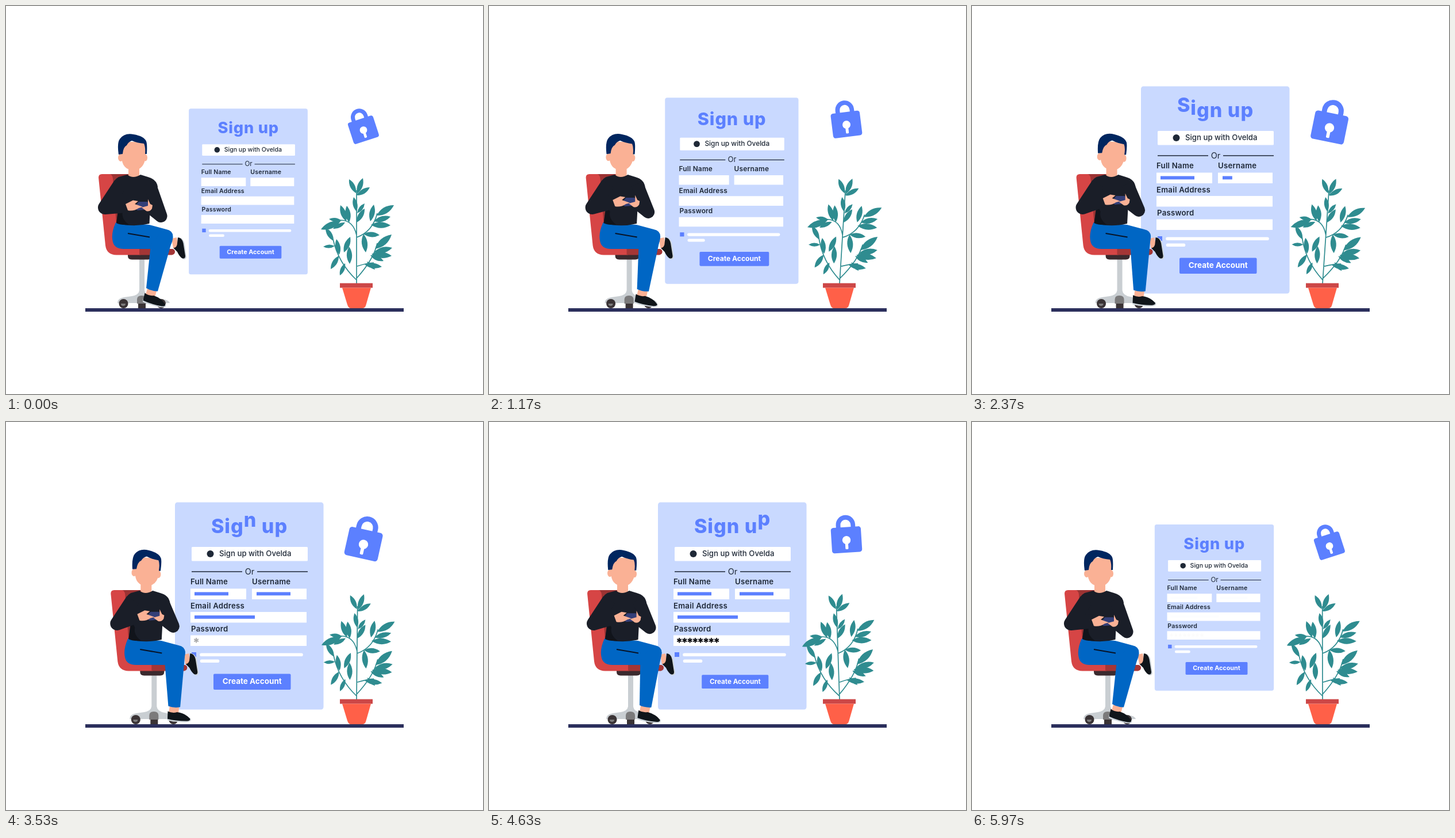
An HTML page for the animation above (6010 ms loop, 830 by 674 pixels).

```html
<!DOCTYPE html>
<html lang="en">
<head>
<meta charset="utf-8">
<title>Sign up</title>
<style>
  html, body { margin: 0; width: 100%; height: 100%; overflow: hidden; background: #fff; }
  svg { display: block; width: 830px; height: 674px; }
  text { font-family: Inter, "Open Sans", sans-serif; fill: #1f2937; }
  .label { font-size: 13.2px; font-weight: 600; letter-spacing: .25px; }
  .title { font-size: 34px; font-weight: 800; letter-spacing: 1px; text-anchor: middle; }
  .star { font-size: 21px; font-weight: 800; text-anchor: middle; fill: #0b0b10; }
  .blue, .title { fill: #5c80ff; }
  .white { fill: #fff; }
  .skin { fill: #fab195; }
  .pants { fill: #0066c4; }
  .sweater { fill: #1a1e28; }
  .sleeve { fill: none; stroke: #1a1e28; stroke-linejoin: round; }
  .shoe { fill: #10151a; }
  .sole { fill: #cfd6dc; }
</style>
</head>
<body>
<svg viewBox="0 0 830 674">
  <g id="panel">
    <rect x="294" y="139.5" width="258.5" height="360" rx="4.5" fill="#c9d9ff"/>
    <text id="title" class="title" x="423.5" y="193">Sign up</text>
    <rect class="white" x="323" y="217" width="202" height="24.5" rx="1.5"/>
    <circle cx="355.5" cy="229" r="6" fill="#1f2937"/>
    <text x="371" y="233" font-size="13.2" font-weight="500">Sign up with Ovelda</text>
    <path d="M323 260H411M437 260H525" stroke="#1f2937" stroke-width="1.4"/>
    <text x="424" y="264.5" font-size="14.5" text-anchor="middle">Or</text>
    <text class="label" x="321" y="282">Full Name</text>
    <text class="label" x="428" y="282">Username</text>
    <text class="label" x="321" y="323.5">Email Address</text>
    <text class="label" x="322" y="363.5">Password</text>
    <path class="white" d="M321 289.5h97v18.5h-97zM428 289.5h95v18.5h-95zM321 330h202v18.5h-202zM321 370.5h202v18.5h-202z"/>
    <g id="entries"></g>
    <rect class="blue" x="323" y="400" width="8" height="8"/>
    <path d="M340 404.3H514M340.5 415.2H368.5" stroke="#fff" stroke-width="5.6" stroke-linecap="round"/>
    <g id="button">
      <rect class="blue" x="361" y="437.5" width="134.5" height="27.5" rx="2"/>
      <text class="white" x="428.3" y="455.3" font-size="13.5" font-weight="700" text-anchor="middle">Create Account</text>
    </g>
  </g>

  <g id="lock">
    <path d="M-13-21V-27a13 13 0 0 1 26 0V-21" fill="none" stroke="#5c80ff" stroke-width="8"/>
    <rect class="blue" x="-26.5" y="-23" width="53" height="45" rx="4.5"/>
    <circle class="white" r="7.3"/>
    <rect class="white" x="-2.6" y="2" width="5.2" height="14" rx="1.5"/>
  </g>

  <rect x="138" y="525" width="554" height="6" fill="#2b2f5c"/>

  <g id="plant" fill="#2f8c90">
    <path fill="none" stroke="#2f8c90" stroke-width="1.7"
      d="M610 483V320M610 402Q638 392 646 360M610 398Q604 372 582 372M610 473Q640 440 646 412M610 476Q578 446 569 405M611 452Q630 446 640 446M610 328L618 322"/>
    <path id="leaves"/>
  </g>
  <rect x="581" y="481.5" width="57" height="8" fill="#cc4747"/>
  <path fill="#ff6048" d="M585 489.500H635L626.500 519Q625 525 620 525H600Q596 525 594 519Z"/>

  <g id="sitter">
    <g fill="#c9ced2">
      <path d="M232 438h9v56Q242 503 255 505L272 509Q284 511 285 516H194Q194 508 205 506L219 504Q231 502 232 494Z"/>
    </g>
    <g fill="#3a3335">
      <circle cx="204.500" cy="517" r="8"/><circle cx="270" cy="517" r="8"/>
      <rect x="230" y="511" width="13" height="14"/>
    </g>
    <path d="M228 517v-7q0-7 8-7t8 7v7z" fill="#7b7a7b"/>
    <path d="M200 517a4 4 0 0 0 8 0zM266 517a4 4 0 0 0 8 0z" fill="#7b7a7b"/>
    <path d="M212 431h42v3q0 6.500-7 6.500h-28q-7 0-7-6.500z" fill="#3a2a2e"/>
    <path d="M180 292H213Q219 292 220 299L227 432H190Z" fill="#9c3333"/>
    <path d="M161 298Q161 292 167 292H180Q185 292 186 300L194 405Q196 418 210 420L234 422V432.500H192Q175 432 173 416Z" fill="#d64545"/>
    <path d="M232 422H290Q294 423 294 427T289 432.500H232Z" fill="#a43636"/>

    <path class="skin" d="M288 404L297 402 300 419 291 421Z"/>
    <path class="sole" d="M302 402Q309 404 311 414L314 436Q313 441 308 440L300 420Z"/>
    <path class="shoe" d="M299 402Q306 402 308.500 412L312 434Q312 440 306 438Q301 434 298 427L291.500 420.500Q298 419 298 412Z"/>

    <path class="pants" d="M191 376Q182 396 186 410Q189 422 205 422H256L276 424Q290 418 290.500 400Q290 390 279 388L249 380Z"/>
    <g id="shin">
      <path class="skin" d="M247 488L263 492 258 509 242 504Z"/>
      <path class="sole" d="M238 509L278 518V522Q275 524 268 523Q248 519 238 514Z"/>
      <path class="shoe" d="M241.500 498.500Q249 504 257 503Q270 507 277 518Q278 522 271 521.500Q252 518 238.500 511.500Z"/>
      <path class="pants" d="M252 414L244 490Q252 495 264 495.500L290.500 402 274 388Z"/>
    </g>
    <path d="M212 395L250 401.500" stroke="#081326" stroke-width="2"/>

    <path class="skin" d="M213 275H232V293Q232 301 222 300T213 292Z"/>
    <path class="sweater" d="M211 293Q221 301 234 293L247 297Q262 301 264 314L251 350L249.500 378Q221 385 192 377L196 345L186 312Q187 302 196 297Z"/>
    <path d="M197 345L203 357Q200 370 214 380Q200 381 192 377Z" fill="#11141b"/>
    <path id="armL" class="sleeve" stroke-width="24"/>
    <path id="armR" class="sleeve" stroke-width="22"/>
    <g id="hands">
      <path d="M223 350L231 340 246 340 250 345 241 354 229 355Z" fill="#343f78"/>
      <path class="skin" d="M208 344L221 337.500 230 339 224 344 238 349 231 351Q222 357 212 355Z"/>
      <path class="skin" d="M247 335.500L251 344 255 346 254 352Q250 358 244 356L236 350 247 347Z"/>
    </g>
    <g id="head">
      <g class="skin">
        <ellipse cx="199.500" cy="263.500" rx="4.500" ry="6.500"/>
        <ellipse cx="242.500" cy="263.500" rx="3.500" ry="6"/>
        <path d="M200 236H243V262Q240 285 222 285Q202 285 201 262Z"/>
      </g>
      <path fill="#00265f" d="M196 258Q193 238 198 231Q206 220 222 223Q240 226 244 235Q246 240 245 257H242Q243 245 240 239Q228 238 219 234Q213 236 210 242Q204 245 203 257Z"/>
    </g>
  </g>
</svg>

<script>
const LOOP = 6010;
const $ = id => document.getElementById(id);
const set = (el, name, value) => el.setAttribute(name, value);
const clamp = u => Math.min(1, Math.max(0, u));
const ramp = (t, start, length) => clamp((t - start) / length);
const ease = (t, start, length) => { const u = ramp(t, start, length); return u * u * (3 - 2 * u); };
const hump = (t, peak, half) => Math.cos(Math.PI / 2 * Math.min(1, Math.abs(t - peak) / half)) ** 2;
const scaleAt = (s, x, y) => `translate(${x * (1 - s)} ${y * (1 - s)}) scale(${s})`;

// Each leaf runs from its base to its tip.
const leaf = ([x, y, u, v]) => {
  const mx = (x + u) / 2, my = (y + v) / 2, nx = (y - v) * .31, ny = (u - x) * .31;
  return `M${x} ${y}Q${mx + nx} ${my + ny} ${u} ${v}Q${mx - nx} ${my - ny} ${x} ${y}Z`;
};
const leaves = [
  [609, 325, 597, 301], [611, 326, 621, 299], [611, 329, 633, 315],
  [610, 357, 605, 332], [611, 360, 624, 343],
  [634, 374, 640, 345], [645, 364, 675, 346], [640, 374, 669, 366], [635, 380, 669, 381],
  [622, 396, 650, 398], [610, 376, 624, 352],
  [592, 374, 582, 346], [597, 376, 593, 347], [584, 373, 562, 370], [582, 374, 548, 388],
  [590, 376, 569, 387],
  [626, 428, 622, 396], [642, 422, 671, 397], [640, 428, 672, 420], [636, 431, 671, 434],
  [634, 433, 657, 443], [624, 449, 654, 453], [628, 444, 642, 458],
  [570, 408, 556, 385], [572, 417, 552, 418], [579, 434, 565, 457],
  [588, 428, 599, 401], [580, 432, 575, 405], [590, 447, 581, 468], [598, 448, 597, 418]
];
set($('leaves'), 'd', leaves.map(leaf).join(''));

const make = (tag, attrs) => {
  const el = document.createElementNS('http://www.w3.org/2000/svg', tag);
  Object.entries(attrs).forEach(([name, value]) => set(el, name, value));
  return $('entries').appendChild(el);
};
const bars = [[328, 295.5, 59, 1600], [436, 295.5, 59, 2200], [328, 336, 105, 2800]]
  .map(([x, y, width, start]) => ({ width, start, el: make('rect', { class: 'blue', x, y, height: 5.8 }) }));
const stars = Array.from({ length: 8 }, (_, i) => {
  const el = make('text', { class: 'star', x: 331 + i * 9.3, y: 391 });
  el.textContent = '*';
  return el;
});

function draw(t) {
  const turn = 2 * Math.PI * t / LOOP;
  const p = (1 - Math.cos(turn)) / 2;
  const lift = 10.5 * Math.sin(turn / 2) ** .7;

  set($('sitter'), 'transform', `translate(${23 * p} 0)`);
  set($('shin'), 'transform', `rotate(${-11.5 * p} 272 400)`);
  set($('head'), 'transform', `rotate(${5 * p} 226 290)`);
  set($('hands'), 'transform', `translate(${-p} ${-lift})`);
  set($('armL'), 'd', `M199 309L172 350L${210 - p} ${347 - lift}`);
  set($('armR'), 'd', `M250 309L269.5 ${365 - lift}L${251 - p} ${350 - lift}`);

  set($('lock'), 'transform',
    `translate(622 ${205 + 42 * (p - .5) ** 2}) rotate(${33 * p - 18}) scale(${.87 + .27 * p})`);
  const sway = Math.sin(turn - .37) - Math.sin(-.37);
  set($('plant'), 'transform', `rotate(${3.2 * sway} 609.5 482)`);

  const back = ease(t, 5030, 1000);
  const grow = ease(t, 676, 1000) - back;
  set($('panel'), 'transform', scaleAt(.8 + .2 * grow, 414.5, 333.5));
  set($('button'), 'transform', scaleAt(1 - .14 * hump(t, 4660, 300), 428.3, 451.2));

  // Letters hop one after another; dy holds the step from one letter to the next.
  const hops = Array.from('Sign up', (_, i) => -13 * hump(t, 2230 + 400 * i, 400));
  set($('title'), 'dy', hops.map((h, i) => h - (hops[i - 1] || 0)).join(' '));

  set($('entries'), 'opacity', 1 - back);
  bars.forEach(b => set(b.el, 'width', b.width * ramp(t, b.start, 600)));
  stars.forEach((el, i) => set(el, 'opacity', ramp(t, 3480 + 120 * i, 150)));
}

const begin = performance.now();
function tick() {
  draw((performance.now() - begin) % LOOP);
  requestAnimationFrame(tick);
}
draw(0);
requestAnimationFrame(tick);
</script>
</body>
</html>
```
